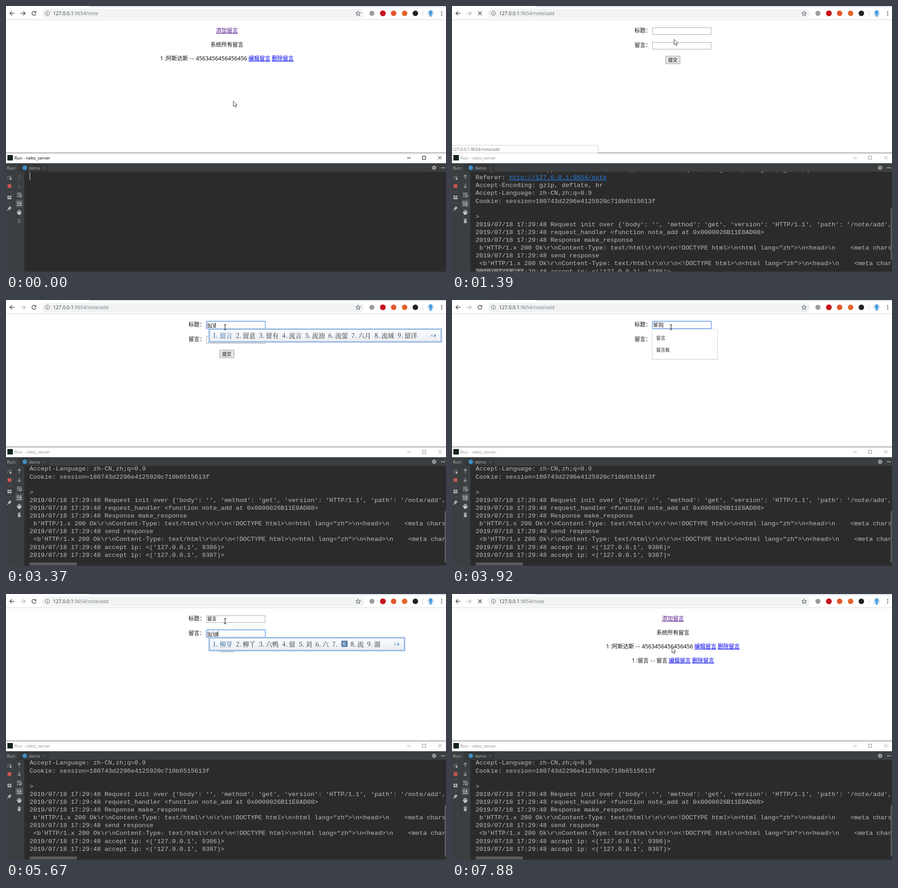
Recreate the animation shown at these times as an HTML page. Size 962 by 582 pixels, loop 8 s.

```html
<!DOCTYPE html>
<html lang="zh">
<head>
<meta charset="utf-8">
<title>Message board</title>
<style>
  html, body { margin: 0; width: 100%; height: 100%; overflow: hidden; background: #fff; }
  svg { display: block; position: absolute; left: 0; top: 0; }
  text { white-space: pre; font-family: "Open Sans", "Noto Sans CJK SC", "Noto Sans CJK", sans-serif; }
  .page { font-family: "Noto Sans", "Noto Sans CJK SC", "Noto Sans CJK", sans-serif; }
  .mono { font-family: "Liberation Mono", "Noto Sans Mono", monospace; }
  .field { font-family: "Liberation Sans", "Noto Sans CJK SC", "Noto Sans CJK", sans-serif; }
  .ime { font-family: "Noto Serif CJK SC", "Noto Sans CJK SC", "Noto Sans CJK", serif; }
  .link { text-decoration: underline; }
</style>
</head>
<body>
<svg id="stage" width="962" height="582" viewBox="0 0 962 582">
  <defs><clipPath id="console"><rect x="41" y="363" width="921" height="218"/></clipPath>
  <linearGradient id="shine" x2="0" y2="1"><stop stop-color="#fbfcfe"/><stop offset="1" stop-color="#e9edf4"/></linearGradient></defs>
  <g id="base"></g><g id="live"></g>
</svg>
<script>
const LOOP = 8000;
const $ = id => document.getElementById(id);
const esc = s => s.replace(/&/g, '&amp;').replace(/</g, '&lt;');
const text = (x, y, s, size, fill = '#000', cls = '') =>
  `<text x="${x}" y="${y}" font-size="${size}" fill="${fill}" class="${cls}">${esc(s)}</text>`;
const rect = (x, y, w, h, fill, more = '') =>
  `<rect x="${x}" y="${y}" width="${w}" height="${h}" fill="${fill}" ${more}/>`;
const disc = (x, y, r, fill) => `<circle cx="${x}" cy="${y}" r="${r}" fill="${fill}"/>`;
const line = (d, color, width = 1, fill = 'none') =>
  `<path d="${d}" fill="${fill}" stroke="${color}" stroke-width="${width}"/>`;
const pen = document.createElement('canvas').getContext('2d');
function fieldWidth(s) {
  pen.font = '10.2px "Liberation Sans", "Noto Sans CJK SC", "Noto Sans CJK", sans-serif';
  return pen.measureText(s).width;
}

const browserBar = () => [
  rect(0, 0, 962, 582, '#fff'),
  rect(183, 0, 779, 2.5, '#dee1e6'),
  rect(0, 29.5, 962, 1, '#d2d3d5'),
  rect(78, 6, 705, 21, '#f1f3f4', 'rx="10.5"'),
  line('M18.5 16H9M13 11.5L8.5 16L13 20.5', '#505357', 1.5),
  `<circle cx="90.5" cy="16" r="4.6" fill="none" stroke="#5f6368"/>`,
  line('M90.5 15.3V18.8M90.5 13.2V14.4', '#5f6368', 1.1),
  line('M770 11.2L771.4 14.6L775 14.9L772.2 17.2L773.1 20.8L770 18.9L766.9 20.8L767.8 17.2L765 14.9L768.6 14.6Z', '#5f6368', 1.1),
  disc(800, 16, 5.5, '#999b9c'), disc(824, 16, 6.3, '#c6141d'),
  disc(847.5, 16, 6, '#e2562b'), disc(871.5, 16, 6, '#e2652b'), disc(895, 16, 6, '#202124'),
  rect(911, 9, 1, 14, '#d4d6d9'),
  disc(928.5, 16, 7.5, '#dbe6f0'),
  `<ellipse cx="928.5" cy="14.5" rx="4" ry="5" fill="#4a9fe0"/>`, rect(926.5, 18, 4, 5, '#4a9fe0'),
  ...[12, 16, 20].map(y => disc(952.5, y, 1.3, '#5f6368'))
].join('');

const consoleFrame = () => [
  rect(0, 321, 962, 1, '#5c5d5e'),
  rect(0, 322, 962, 22, '#fff'),
  rect(3, 326, 12, 12, '#13251f'),
  rect(0, 344, 962, 238, '#3c3f41'),
  rect(27, 345, 67, 18, '#35383a'),
  rect(0, 362.5, 962, 1, '#323537'),
  rect(40, 363, 922, 218, '#2b2b2b'),
  rect(18, 363, 1, 218, '#333638'),
  text(2, 357.5, 'Run:', 9.3, '#bbb'),
  disc(41, 354, 5, '#3f8fc6'),
  text(50, 357.5, 'demo', 9.2, '#bbb'),
  line('M81 352L86 357M86 352L81 357', '#686b6d'),
  `<circle cx="936" cy="354" r="2.7" fill="none" stroke="#afb1b3" stroke-width="2.2"/>`,
  `<circle cx="936" cy="354" r="4.1" fill="none" stroke="#afb1b3" stroke-width="1.4" stroke-dasharray="1.6 1.62"/>`,
  rect(951, 353.3, 9, 1.5, '#afb1b3'),
  line('M9.5 373.5A3.6 3.6 0 1 0 5 379.5M10.5 371V374.5H7', '#7f8284', 1.2), rect(8, 376, 4, 4, '#afb1b3'),
  rect(3.5, 390, 8, 8, '#c75450'),
  rect(2, 406, 12, 1, '#515456'), rect(2, 430, 12, 1, '#515456'),
  rect(3, 415, 4, 3.4, '#afb1b3'), rect(8, 415, 4, 3.4, '#afb1b3'), rect(3, 419.4, 9, 3.4, '#afb1b3'),
  line('M8 438L12 442L10.5 442.5L8.5 445L8 446.5L4 442.5L5.5 442L8 439.5Z', '#afb1b3', 1, '#afb1b3'),
  line('M6 444.5L2.5 448', '#afb1b3', 1.2),
  line('M24 409.5H34M24 413H32.5A2 2 0 0 1 32.5 417H29M31 415L29 417L31 419M24 417H27', '#afb1b3', 1.3),
  rect(21, 424, 16, 16, '#55595c', 'rx="2"'),
  line('M24 429H28M24 432H28M24 436H34M31.5 427V433M29.5 431L31.5 433.5L33.5 431', '#c4c6c7', 1.3),
  rect(26, 446.5, 6, 2, '#afb1b3'), rect(24, 449.3, 10, 4.5, '#afb1b3'), rect(26, 453, 6, 3.5, '#d0d1d2')
].join('');

const log = [
  'Accept: text/html,application/xhtml+xml,application/xml;q=0.9,image/webp,image/apng,*/*;q=0.8',
  'Referer: ',
  'Accept-Encoding: gzip, deflate, br',
  'Accept-Language: zh-CN,zh;q=0.9',
  'Cookie: session=180743d2296e4125920c710b6515613f',
  '',
  '>',
  "@Request init over {'body': '', 'method': 'get', 'version': 'HTTP/1.1', 'path': '/note/add', 'headers'",
  '@request_handler <function note_add at 0x0000026B11E8AD08>',
  '@Response make_response',
  " b'$",
  '@send response',
  " <b'$",
  "@accept ip: <('127.0.0.1', 9386)>",
  "@accept ip: <('127.0.0.1', 9387)>"
].map(s => s.replace('@', '2019/07/18 17:29:48 ').replace('$', () =>
  String.raw`HTTP/1.x 200 Ok\r\nContent-Type: text/html\r\n\r\n<!DOCTYPE html>\n<html lang="zh">\n<head>\n    <meta charset="UTF-8">`));

function consoleView(s) {
  const on = s.log !== undefined, tone = on ? '#afb1b3' : '#5d6062', ink = s.active ? '#000' : '#8f8f8f';
  let out = text(18.5, 336, 'Run - neko_server', 9.4, ink) +
    line('M877 332.5H885M910.5 328.5H917.5V335.5H910.5ZM945 328.5L952 335.5M952 328.5L945 335.5', ink) +
    line('M29 378.5V370M25.8 373L29 369.8L32.2 373M29 389V397.5M25.8 394.5L29 397.7L32.2 394.5', tone, 1.2) +
    line('M25.5 467H32.5M27.5 465.7H30.5', tone, 1.3) + rect(26, 468.5, 6, 6.5, tone);
  if (!on) return out + rect(51.5, 364, 1.2, 16, '#d0d0d0');
  const rows = log.map((row, i) => {
    const y = +(s.log + i * 17.12).toFixed(1);
    return text(51.5, y, row, 13.66, '#bbb', 'mono') +
      (i === 1 ? text(125, y, 'http://127.0.0.1:9654/note', 13.66, '#287bde', 'mono link') : '');
  }).join('');
  return out + `<g clip-path="url(#console)">${rows}</g>` +
    rect(52, 574.5, 103, 6, '#a6a6a6', 'opacity=".4"') +
    rect(959, s.log > 340 ? 443 : 462, 3, 112, '#595b5c');
}

const link = (x, y, s, color = '#0000ee') => text(x, y, s, 12, color, 'page link');
const word = (x, y, s, size = 12) => text(x, y, s, size, '#111', 'page');
const dashes = (x, y) => word(x, y, '-') + word(x + 5.5, y, '-');

function listPage(s) {
  let out = link(459, 58, '添加留言', s.pressed ? '#ff0000' : '#551a8b') + word(447, 88.5, '系统所有留言') +
    word(337, 119, '1 :') + word(350, 119, '阿斯达斯') + dashes(401.5, 119) +
    word(415, 119, '4563456456456456', 12.24) + link(530, 119, '编辑留言') + link(581, 119, '删除留言');
  if (s.added) out += word(393, 149.5, '1 :') + word(406, 149.5, '留言') + dashes(434, 149.5) +
    word(447, 149.5, '留言') + link(474, 149.5, '编辑留言') + link(525, 149.5, '删除留言');
  return out;
}

function field(y, value, focused, caret, composing) {
  const box = focused
    ? rect(438, y - .5, 129, 16, '#fff', 'stroke="#5b93e8" stroke-width="1.4" rx=".8"')
    : rect(438.5, y + .5, 128, 15, '#fff', 'stroke="#a6a6a6"');
  return box + text(440, y + 11.3, value, 10.2, '#000', 'field' + (composing ? ' link' : '')) +
    (focused && caret ? rect(440 + fieldWidth(value), y + 2.5, 1, 11, '#000') : '');
}

function dropdown(y, items) {
  const h = items.length * 26.8 + 12;
  return rect(437, y + 1, 144, h, '#000', 'opacity=".16" rx="2"') +
    rect(437.5, y, 143, h, '#fff', 'stroke="#c9c9c9" stroke-width=".8" rx="2"') +
    items.map((s, i) => text(446.5, y + 22.5 + i * 26.8, s, 9.9, '#222', 'page')).join('');
}

function candidates(y, words) {
  let x = 452, out = '';
  words.forEach((w, i) => {
    const color = i ? '#2c2c2c' : '#2f6296', emoji = w === '6*';
    out += text(x, y + 20.5, i + 1 + '.', 14, color, 'ime');
    out += emoji
      ? rect(x + 20, y + 8, 14, 14, '#5f86ad', 'rx="2"') + text(x + 23.3, y + 19, '6', 11, '#fff')
      : text(x + 15, y + 20.5, w, 14, color, 'ime');
    x += emoji ? 40 : 22.5 + 14 * w.length;
  });
  const right = x + 47;
  return rect(444, y + 1.5, right - 445.5, 28.5, 'url(#shine)', 'stroke="#a9c8ea" stroke-width="3"') +
    rect(445, y + 2.5, right - 447.5, 26.5, 'none', 'stroke="#6f9dcc" stroke-width=".8"') + out +
    line(`M${right - 21} ${y + 12}v8l-4 -4z`, 'none', 0, '#9fbad6') +
    line(`M${right - 17} ${y + 12}v8l4 -4z`, 'none', 0, '#5a8fc8');
}

function formPage(s) {
  const first = s.focus === 1, top = first ? 62 : 94;
  return word(399, 58, '标题：') + word(399, 90, '留言：') +
    field(47, s.title, first, s.caret, first && s.ime) +
    field(79, s.body, s.focus === 2, s.caret, !first && s.ime) +
    rect(467.5, 109.5, 31, 17, s.pressed ? '#d4d4d4' : s.hover ? '#f2f2f2' : '#e6e6e6', 'stroke="#9c9c9c"') +
    text(472.7, 122, '提交', 10, '#000', 'page') +
    (s.hints ? dropdown(top + 2, s.hints) : '') + (s.ime ? candidates(top, s.ime) : '');
}

const pointers = {
  arrow: line('M0 0V12L2.8 9.4L4.7 13.6L6.5 12.8L4.7 8.7H8.5Z', '#222', .9, '#fff'),
  beam: line('M-2.5 -5.5H-.6L0 -5L.6 -5.5H2.5M0 -5V5M-2.5 5.5H-.6L0 5L.6 5.5H2.5', '#111', 1.1),
  hand: line('M0 0C1.2 0 1.6 .6 1.6 1.6V5L6.2 6Q7.5 6.4 7.2 8L6.2 13H-.3L-4 8.5Q-3.6 6.8 -1.6 8.4V1.6C-1.6 .6 -1 0 0 0Z', '#222', .9, '#fff')
};

function view(s) {
  return line('M32 16H41.5M37.5 11.5L42 16L37.5 20.5', s.forward ? '#505357' : '#b9bbbe', 1.5) +
    (s.loading
      ? line('M57 12L65 20M65 12L57 20', '#505357', 1.6)
      : line('M64.4 13A4.4 4.4 0 1 0 65.4 17.2', '#505357', 1.5) + line('M66 11V15.4H61.6Z', 'none', 0, '#505357')) +
    `<text x="103" y="20" font-size="10.6" fill="#33363a">127.0.0.1<tspan fill="#74787c">:9654${s.path}</tspan></text>` +
    (s.page === 'list' ? listPage(s) : formPage(s)) +
    (s.status ? rect(-1, 304.5, 320.5, 17, '#fff', 'stroke="#cfcfcf" rx="2"') +
      text(0, 317, '127.0.0.1:9654/note/add', 9.1, '#6a6d70') : '') +
    consoleView(s) +
    `<g transform="translate(${s.at})">${pointers[s.pointer]}</g>`;
}

const wide = ['留言', '留意', '留有', '流言', '流油', '流萤', '六月', '流域', '留洋'];
const saved = ['留言', '留言板'];
const yan = ['留言', '流言', '六言', '留', '流', '六', '6*', '柳', '溜'];
const ya = ['柳芽', '柳丫', '六鸭', '留', '刘', '六', '6*', '流', '溜'];
const li = ['里', '力', '离', '利益', '理', '立', '6*', '例如', '李'];
const el = ['了', '来', '里', '老', '啦', '两', '6*', '路', '6*'];

// Each step changes only what differs from the step before.
const steps = [
  [0, { page: 'list', path: '/note', forward: true, active: true, pointer: 'arrow', at: [497, 208], title: '', body: '' }],
  [310, { at: [498, 190] }],
  [420, { at: [497, 151] }],
  [530, { at: [494, 110] }],
  [640, { at: [490, 78] }],
  [750, { at: [487, 57], pointer: 'hand', status: true }],
  [860, { at: [486, 53] }],
  [970, { active: false, pressed: true }],
  [1080, { pressed: false, log: 362 }],
  [1200, { loading: true, forward: false }],
  [1290, { page: 'form', path: '/note/add', pointer: 'arrow', at: [486, 60] }],
  [1390, { at: [485.5, 73] }],
  [1510, { loading: false, status: false, log: 322, at: [483, 68] }],
  [1620, { pointer: 'beam', at: [480, 61] }],
  [1730, { at: [479, 59.5] }],
  [1950, { focus: 1, caret: true }],
  [2070, { hints: ['345', '22222', '阿萨德', '阿萨德阿斯大苏打的', '123456', 'Category'] }],
  [2500, { caret: false }],
  [2930, { caret: true, hints: null, title: 'l', ime: el }],
  [3040, { title: 'li', ime: li }],
  [3260, { title: 'liu', ime: yan }],
  [3370, { title: "liu'y", ime: wide }],
  [3600, { title: "liu'ya", ime: ya }],
  [3700, { title: "liu'yan", ime: yan }],
  [3920, { title: '留言', ime: null, hints: saved }],
  [4130, { hints: null, focus: 2 }],
  [4680, { caret: false }],
  [4900, { caret: true, body: 'l' }],
  [5010, { ime: el }],
  [5230, { body: 'li', ime: li }],
  [5450, { body: "liu'y", ime: wide }],
  [5670, { body: "liu'ya", ime: ya }],
  [5780, { body: "liu'yan", ime: yan }],
  [5890, { body: '留言', ime: null, hints: saved }],
  [6440, { pointer: 'arrow', at: [462, 84] }],
  [6550, { at: [405, 124] }],
  [6660, { at: [340, 153] }],
  [6770, { at: [306, 163] }],
  [6880, { hints: null, focus: 0 }],
  [6990, { at: [352, 156] }],
  [7110, { at: [420, 140] }],
  [7220, { at: [465, 125] }],
  [7330, { at: [479, 118], hover: true }],
  [7440, { at: [481, 117], pressed: true }],
  [7550, { pressed: false }],
  [7760, { loading: true }],
  [7880, { page: 'list', path: '/note', added: true }]
];

$('base').innerHTML = browserBar() + consoleFrame();
const start = performance.now();
let shown = -1;
function tick() {
  const t = (performance.now() - start) % LOOP;
  const count = steps.filter(([at]) => at <= t).length;
  if (count !== shown) {
    shown = count;
    $('live').innerHTML = view(Object.assign({}, ...steps.slice(0, count).map(step => step[1])));
  }
  requestAnimationFrame(tick);
}
tick();
</script>
</body>
</html>
```
